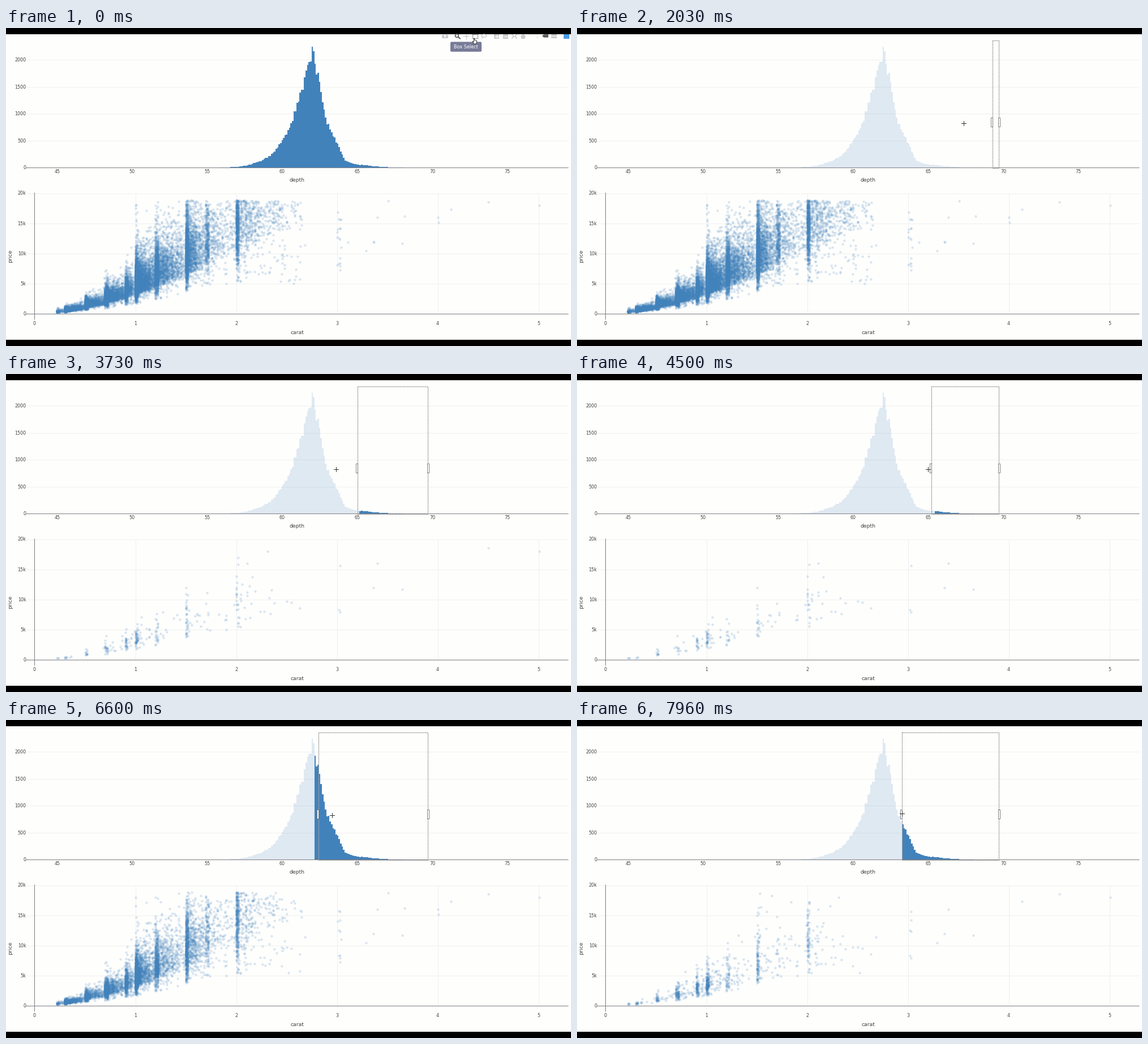
These frames come from a looping animation (998x561 px, 8 s). A matplotlib script:

```python
import numpy as np
import matplotlib.pyplot as plt
from matplotlib.animation import FuncAnimation
from matplotlib.collections import LineCollection
from matplotlib.patches import Circle, FancyBboxPatch, Polygon, Rectangle

W, H, DPI = 998, 561, 100
STEP, LOOP = 40, 8000
PT = 72 / DPI
BLUE, INK, PAPER = "#4282bb", "#444444", "#fefefd"
DARK, PALE, AXIS = "#5a5a60", "#c9c9cc", "#7c7c80"
rng = np.random.default_rng(7)

fig = plt.figure(figsize=(W / DPI, H / DPI), dpi=DPI, facecolor="black")
ax = fig.add_axes([0, 0, 1, 1])
ax.set_xlim(0, W)
ax.set_ylim(H, 0)
ax.axis("off")


# ---- scales -------------------------------------------------------------
def depth_x(d):
    return 90.2 + (d - 45) * 26.51


def x_depth(x):
    return (x - 90.2) / 26.51 + 45


def count_y(n):
    return 246.5 - n * 0.09525


def carat_x(c):
    return 50.5 + c * 178.02


def price_y(p):
    return 504.5 - p * 10.65


# ---- drawing helpers ----------------------------------------------------
def text(x, y, s, size=8.0, ha="center", color=INK, **kw):
    return ax.text(x, y, s, fontsize=size * PT, ha=ha, color=color,
                   family="DejaVu Sans", **kw)


def line(xs, ys, color, width=1.0, z=5, **kw):
    return ax.plot(xs, ys, color=color, lw=width * PT, zorder=z, **kw)[0]


def rect(x, y, w, h, face, edge="none", width=0.8, z=5):
    return ax.add_patch(Rectangle((x, y), w, h, fc=face, ec=edge,
                                  lw=width * PT, zorder=z))


def shape(points, face):
    return ax.add_patch(Polygon(points, fc=face, ec="none", zorder=5))


# ---- page, grid and labels ----------------------------------------------
rect(0, 11, W, 539, PAPER, z=0)
grid = [[(37, count_y(n)), (993, count_y(n))] for n in range(500, 2001, 500)]
grid += [[(37, price_y(p)), (993, price_y(p))] for p in (5, 10, 15, 20)]
grid += [[(carat_x(c), 291.5), (carat_x(c), 504)] for c in range(1, 6)]
ax.add_collection(LineCollection(grid, colors="#eeeeee", lw=0.9 * PT, zorder=1))
line([36, 993], [246.6, 246.6], AXIS, z=6, snap=False)
line([36, 993], [504.6, 504.6], AXIS, z=2, snap=False)
line([50.5, 50.5], [291, 514], AXIS, z=2, snap=False)

for n in range(0, 2001, 500):
    text(35.5, count_y(n) + 2.9, str(n), ha="right")
for d in range(45, 76, 5):
    text(depth_x(d), 255.6, str(d))
for p in range(0, 21, 5):
    text(35.5, price_y(p) + 2.9, f"{p}k" if p else "0", ha="right")
for c in range(6):
    text(carat_x(c), 523.6, str(c))
text(514.5, 271.4, "depth", 9.3)
text(514.5, 539.8, "carat", 9.3)
text(7.5, 402, "price", 9.3, va="center", rotation=90)

# ---- histogram: log-linear between a few knees --------------------------
knees = np.array([(54, 0.3), (58, 75), (60, 510), (61, 1200), (62, 2240),
                  (62.5, 1600), (63, 870), (63.8, 420), (64.2, 140),
                  (65, 58), (65.7, 45), (68, 4), (70, 0.3)])
depths = np.round(np.arange(54, 70.01, 0.1), 1)
counts = np.exp(np.interp(depths, knees[:, 0], np.log(knees[:, 1])))
counts *= np.where(depths == 62, 1, rng.uniform(0.92, 1.04, len(depths)))
counts[counts < 4] = 0
bar_y = count_y(counts)
edges = depth_x(np.append(depths - 0.05, depths[-1] + 0.05))
faint, solid = (ax.stairs(bar_y, edges, baseline=246.5, fill=True, color=BLUE,
                          alpha=alpha, lw=0, zorder=z)
                for alpha, z in ((0.165, 3), (1, 4)))

# ---- scatter ------------------------------------------------------------
MAX_PRICE = 18.82
WEIGHTS = np.array([0.22, 0.3, 0.5, 0.7, 0.9, 1.0, 1.2, 1.5, 1.7, 2.0, 2.65])
SHARE = [150, 2400, 2000, 2900, 1100, 4500, 2700, 2400, 800, 2000]


def near_spike(start, gap, spike):
    """Carats heaped on a round weight, thinning out towards the next."""
    n = len(start)
    off = rng.random(n) > spike
    step = np.where(off, rng.exponential(gap * 0.5, n),
                    rng.integers(0, 3, n) * 0.01)
    return start + step, off


def in_range(c, p, d):
    ok = (p > 1.7 * c ** 1.6) & (p < MAX_PRICE)
    return np.column_stack([c, np.maximum(p, 0.33), d])[ok]


def common():
    """Stones of usual depth."""
    start = np.repeat(WEIGHTS[:-1], SHARE)
    gap = np.repeat(np.diff(WEIGHTS), SHARE)
    c, off = near_spike(start, gap, 0.33)
    n = len(c)
    mid = 4.9 * start ** 1.65 * (c / start) ** 1.1
    tail = np.where(start >= 1, 0.17, 0.09)
    p = mid * np.exp(rng.normal(0, 0.25, n) + rng.exponential(tail) - 0.1)
    usual = depths <= 62.8
    d = rng.choice(depths[usual], n, p=counts[usual] / counts[usual].sum())
    drop = off & ((p < 0.7 * mid) & (rng.random(n) < 0.85) | (c > start + gap))
    return in_range(c[~drop], p[~drop], d[~drop])


def deep(n):
    """Unusually deep stones: few and cheaper."""
    odds = np.array([2, 3, 6, 13, 12, 27, 7, 17, 2, 13])
    start = rng.choice(WEIGHTS[:-1], n, p=odds / odds.sum())
    c, _ = near_spike(start, 0.25, 0.66)
    d = 63 + rng.exponential(1.5, n)
    base = np.where(d > 65.6, 2.95, 3.7)
    p = base * c ** 1.65 * np.exp(rng.normal(0, 0.36, n))
    return in_range(c, p, d)


def stray(n, low, high, cheap, dear):
    return np.column_stack([rng.uniform(low, high, n),
                            rng.uniform(cheap, dear, n),
                            rng.choice([61, 61.5, 62.3, 64.2, 66.2], n)])


largest = np.array([(3.4, 16, 66.5), (3.65, 11.7, 67), (3.51, 18.7, 62.5),
                    (3.67, 16.2, 62.4), (4, 16, 62.5), (4.01, 15.2, 62.5),
                    (4.13, 17.3, 64.8), (4.5, 18.55, 65.8), (5.01, 18, 65.5)])
stones = np.vstack([common(), deep(1200), stray(75, 1.6, 2.7, 5, 11.5),
                    stray(18, 3.0, 3.04, 6.5, 18.8),
                    stray(4, 3.1, 3.5, 9.5, 13), largest])
dot_x = carat_x(np.round(stones[:, 0], 2))
dot_y = price_y(stones[:, 1])
dot_depth = stones[:, 2]
dots = ax.plot(dot_x, dot_y, "o", ms=4.4 * PT, mfc=BLUE, mec="none", mew=0,
               alpha=0.19, zorder=3)[0]

# ---- toolbar ------------------------------------------------------------
zoom = [ax.add_patch(Circle((796.4, 13.6), 2.9, fc="none", ec=DARK,
                            lw=1.7 * PT, zorder=5)),
        line([798.6, 802], [15.8, 18.6], DARK, 1.9)]
a = np.linspace(0.6, 6.4, 24)
bar = zoom + [
    rect(770, 11.5, 11, 6.5, PALE), rect(774, 12.8, 3.4, 3.4, PAPER),
    line([808.5, 817.5], [14, 14], PALE, 1.4),
    line([813, 813], [11, 18.5], PALE, 1.4),
    line([824, 833, 833, 824, 824], [11.3, 11.3, 18.3, 18.3, 11.3], DARK, 1.3,
         ls=(0, (1.3, 1))),
    line(844.5 + 4.6 * np.cos(a), 13.6 + 2.6 * np.sin(a), PALE, 1.3),
    line([841.5, 840.5], [15.5, 18.8], PALE, 1.3)]
for x in (867, 882.5):
    bar += [rect(x - 4.5, 11, 9, 7.6, PALE),
            line([x - 2.7, x + 2.7], [14.6, 14.6], PAPER, 1.3)]
bar += [line([867, 867], [12, 17.2], PAPER, 1.3)]
for sx in (-1, 1):
    for y in (11.5, 18):
        bar += [line([898 + sx * 1.2, 898 + sx * 4.2], [14.6, y], PALE, 1.6)]
bar += [shape([(908, 14.6), (913.5, 10.8), (919, 14.6)], PALE),
        rect(910, 14.4, 7, 4.2, PALE),
        line([938, 938], [11.5, 18.5], PALE, 1.2, ls=(0, (1.6, 1.2))),
        shape([(947, 14), (950, 11.3), (958, 11.3), (958, 16.7), (950, 16.7)],
              DARK),
        rect(963, 11, 10.5, 3, PALE), rect(963, 15, 10.5, 3, PALE),
        rect(985, 11, 10, 8, "#4a98e6")]

tip = [ax.add_patch(FancyBboxPatch((785.5, 25), 54, 16.2,
                                   boxstyle="round,pad=0,rounding_size=1.5",
                                   fc="#777b97", ec="#777b97", lw=0.8,
                                   zorder=8)),
       text(812.5, 36, "Box Select", 8.1, color="white", zorder=9)]

# ---- selection box and pointers -----------------------------------------
RIGHT = 745.5
frame_bg = line([], [], "white", 0.9, 7)
frame_fg = line([], [], "#222222", 0.9, 8, ls=(0, (1.3, 1.65)))
grips = [rect(0, 158, 3, 16.4, "white", "#666666", z=9) for _ in range(2)]
grips[1].set_x(RIGHT - 1.2)
marquee = [frame_bg, frame_fg] + grips

cross = line([], [], "#333333", 1.0, 11)
HAND = np.array([(-1.6, -4.6), (-0.4, -4.6), (0, -1.6), (2.8, -1), (3.6, 0),
                 (3.2, 3.2), (2.4, 5), (-1.4, 5), (-3.8, 1.4), (-3.6, 0.4),
                 (-1.6, 1.4)])
hand = ax.add_patch(Polygon(HAND, fc="white", ec="#222222", lw=0.9 * PT,
                            zorder=11))

# ---- motion: eased pointer moves (start, end, x, y) ---------------------
HOME = np.array([828.0, 23.0])
MOVES = [(700, 930, 722, 146), (1130, 1500, RIGHT, 168),
         (1800, 2160, 652, 168), (2350, 2620, 625, 168),
         (3560, 3800, 575, 168), (3820, 4100, 648, 168),
         (4150, 4450, 620, 168), (4930, 5200, 565, 165),
         (5600, 5800, 537, 165), (6320, 6800, 594, 169),
         (7460, 7760, 574, 165)]
ZOOM_OFF, TIP_OFF, HAND_OFF = 360, 770, 750
FADE, DRAG, FILTER = 1560, 1760, 2050
BOX_LAG, BAR_LAG, DOT_LAG = 140, 180, 300


def pointer(t):
    pos = HOME
    for start, end, x, y in MOVES:
        u = np.clip((t - start) / (end - start), 0, 1)
        pos = pos + (np.array([x, y]) - pos) * u * u * (3 - 2 * u)
    return pos


def edge_x(t, lag):
    """Left edge of the selection; each part follows the pointer late."""
    return min(pointer(max(t - lag, 1500))[0], RIGHT)


def chosen(d, t, lag):
    return (d >= x_depth(edge_x(t, lag))) & (d <= x_depth(RIGHT))


def draw_bars(t):
    on = chosen(depths, t, BAR_LAG) if t >= DRAG else depths > 0
    solid.set_data(values=np.where(on, bar_y, 246.5))
    faint.set_data(values=np.where(on, 246.5, bar_y))


def draw_dots(t):
    on = chosen(dot_depth, t, DOT_LAG) if t >= FILTER else dot_depth > 0
    dots.set_data(dot_x[on], dot_y[on])


def draw_marquee(t):
    for art in marquee:
        art.set_visible(t >= DRAG)
    x = edge_x(t, BOX_LAG)
    for art in (frame_bg, frame_fg):
        art.set_data([x, RIGHT, RIGHT, x, x], [22.3, 22.3, 246.5, 246.5, 22.3])
    grips[0].set_x(x - 2.8)


def draw_pointer(t):
    x, y = pointer(t)
    hand.set_visible(t < HAND_OFF)
    hand.set_xy(HAND + (x, y))
    cross.set_visible(t >= HAND_OFF)
    cross.set_data([x - 4, x + 4, np.nan, x, x],
                   [y, y, np.nan, y - 4, y + 4])


def draw_toolbar(t):
    shade = DARK if t < ZOOM_OFF else PALE
    zoom[0].set_edgecolor(shade)
    zoom[1].set_color(shade)
    alpha = float(np.clip(1 - (t - FADE) / 300, 0, 1))
    for art in bar:
        art.set_visible(alpha > 0)
        art.set_alpha(alpha if alpha < 1 else None)
    for art in tip:
        art.set_visible(t < TIP_OFF)


def draw(i):
    t = (i + 0.5) * STEP
    for part in (draw_bars, draw_dots, draw_marquee, draw_pointer, draw_toolbar):
        part(t)
    return []


anim = FuncAnimation(fig, draw, frames=LOOP // STEP, interval=STEP,
                     repeat=True, repeat_delay=0, blit=False)
plt.show()
```
